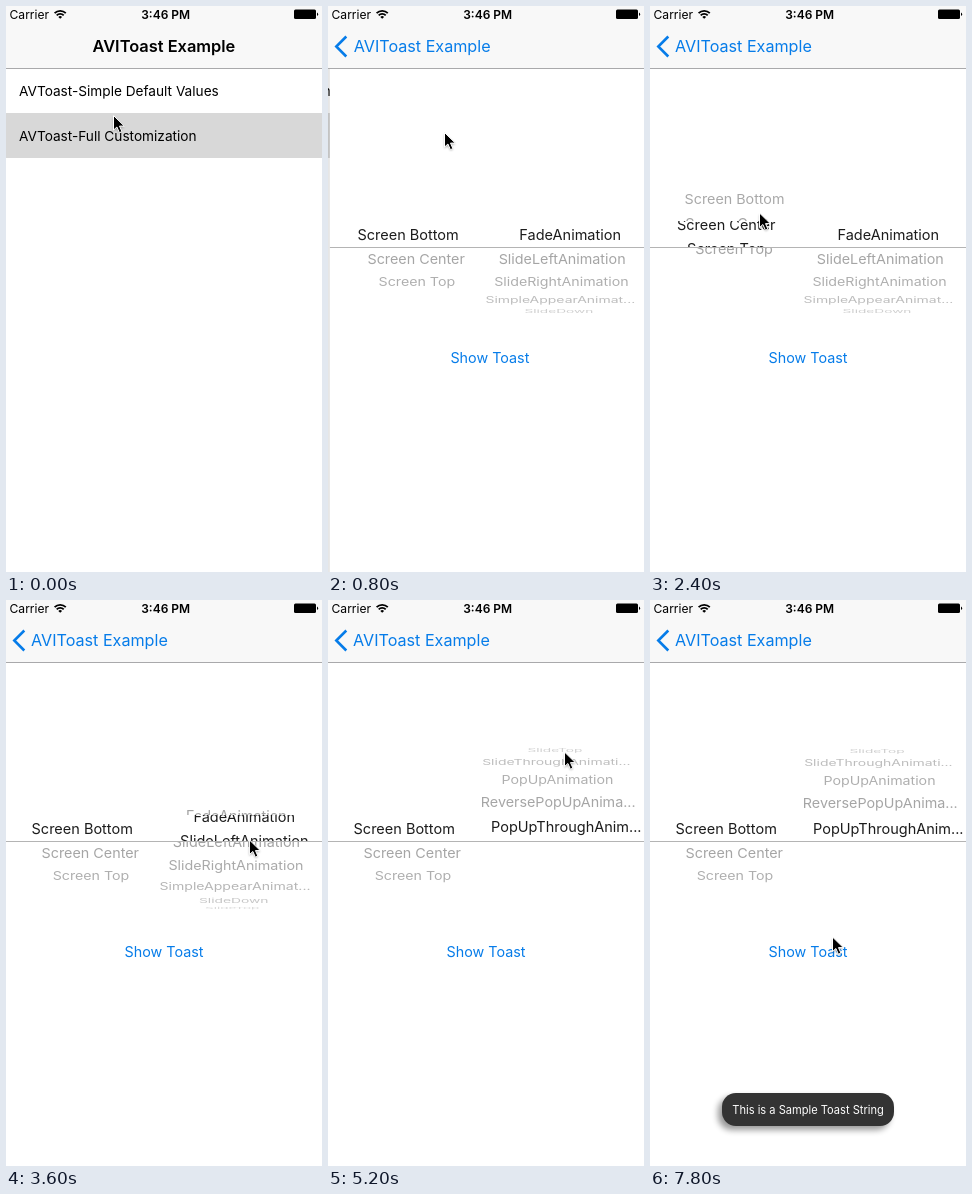
These frames come from a looping animation (316x566 px, 8 s). An HTML page:

```html
<!DOCTYPE html>
<html lang="en">
<head>
<meta charset="utf-8">
<title>Toast example</title>
<style>
html, body { margin: 0; width: 100%; height: 100%; overflow: hidden; background: #fff; }
svg { display: block; width: 100vw; height: 100vh; font-family: Inter, Roboto, sans-serif; }
.mid { text-anchor: middle; }
.grey { fill: #a2a2a2; font-size: 14.4px; }
.dark { fill: #1c1c1c; font-size: 14.5px; }
.blue { fill: #067ce9; }
</style>
</head>
<body>
<svg viewBox="0 0 316 566">
  <defs>
    <clipPath id="band"><rect y="215" width="316" height="26"/></clipPath>
    <clipPath id="around"><path d="M0 130H316V215H0ZM0 241H316V330H0Z"/></clipPath>
    <filter id="blur" x="-20%" y="-60%" width="140%" height="220%"><feGaussianBlur stdDeviation="3"/></filter>
    <filter id="soft" x="-50%" y="-50%" width="200%" height="200%"><feGaussianBlur stdDeviation="1"/></filter>
  </defs>

  <g id="list" font-size="13.65">
    <rect y="107" width="316" height="45" fill="#d8d8d8"/>
    <text x="13" y="89.5">AVToast-Simple Default Values</text>
    <text x="13" y="134.5">AVToast-Full Customization</text>
  </g>
  <rect id="dim" y="62" width="316" height="504"/>
  <rect id="page" y="62" width="316" height="504" fill="#fff"/>

  <g id="content">
    <g id="outer" class="mid grey" clip-path="url(#around)"></g>
    <g id="inner" class="mid dark" clip-path="url(#band)"></g>
    <rect x="-2" y="241" width="320" height="1" fill="#b4b4b4"/>
    <text id="button" class="mid blue" x="158" y="356.5" font-size="14.35">Show Toast</text>
  </g>

  <rect width="316" height="62" fill="#f8f8f8"/>
  <rect y="62" width="316" height="1" fill="#a9a9ab"/>
  <text x="3.5" y="12.5" font-size="12.1">Carrier</text>
  <g fill="none" stroke="#000" stroke-width="1.8">
    <path d="M48.6 7.2a7.8 7.8 0 0 1 11.2 0M50.7 9.4a4.9 4.9 0 0 1 7 0"/>
    <path d="M54.2 12.8l-1.9-1.9a2.7 2.7 0 0 1 3.8 0z" fill="#000" stroke="none"/>
  </g>
  <text class="mid" x="159.7" y="12.5" font-size="12" font-weight="600">3:46 PM</text>
  <rect x="288" y="3.5" width="22" height="9.5" rx="1.5"/>
  <path d="M311 6.5a2 2 0 0 1 0 3.6z"/>
  <path id="chevron" d="M18.3 30.5L8.3 40.5L18.3 50.5" fill="none" stroke="#067ce9" stroke-width="2.6"/>
  <text id="title" y="46" font-size="16.4" font-weight="600">AVIToast Example</text>
  <text id="back" class="blue" y="46" font-size="16.15">AVIToast Example</text>

  <g id="toast">
    <rect id="shade" x="-90" y="-12.5" width="172" height="33" rx="14" filter="url(#blur)"/>
    <rect x="-86" y="-16.5" width="172" height="33" rx="14" fill="#333"/>
    <text class="mid" y="4" font-size="11.1" fill="#fff">This is a Sample Toast String</text>
  </g>

  <g id="cursor">
    <path d="M0 1.5V16L3.4 13L6 18L8.4 17L6 12H10.8Z" opacity=".35" filter="url(#soft)"/>
    <path d="M0 0V14.6L3.4 11.5L5.9 17.2L8.4 16.1L6 10.6H10.8Z" stroke="#fff" stroke-width="1" stroke-linejoin="round"/>
  </g>
</svg>
<script>
const LOOP = 8000, STEP = 200, WIDTH = 316;
const CENTER = 228, RADIUS = 81, ANGLE = Math.PI / 10, PITCH = 24;
const $ = id => document.getElementById(id);

// progress 0..1 of t between a and b, linear and eased
const ramp = (t, a, b) => Math.min(1, Math.max(0, (t - a) / (b - a)));
const ease = (t, a, b) => { const u = ramp(t, a, b); return u * u * (3 - 2 * u); };

const columns = [
  { x: -74, darkX: 76.2, names: ["Screen Bottom", "Screen Center", "Screen Top"],
    scroll: t => 1.42 * Math.sin(Math.PI * ramp(t, 1800, 3000)) ** 2 },
  { x: 72.5, darkX: 238.3,
    names: ["FadeAnimation", "SlideLeftAnimation", "SlideRightAnimation", "SimpleAppearAnimat...",
      "SlideDown", "SlideTop", "SlideThroughAnimati...", "PopUpAnimation",
      "ReversePopUpAnima...", "PopUpThroughAnim..."],
    // drag past the last row, then spring back to it
    scroll: t => 10.12 * ease(t, 3450, 4600) - 1.12 * ease(t, 4600, 5300) }
];

// pointer moves: start, end, destination
const moves = [
  [0, 200, 112, 126.5], [400, 800, 116.5, 126.5], [1000, 1600, 176, 337], [1600, 2000, 112, 242],
  [2000, 2400, 109.5, 207], [2600, 3400, 244, 247], [3400, 4600, 236.5, 152],
  [5200, 6000, 177.5, 352], [6400, 7000, 196, 317], [7400, 7800, 182.5, 337]
];

function pointer(t) {
  let x = 107.5, y = 109.5;
  for (const [a, b, toX, toY] of moves) {
    const u = ease(t, a, b);
    x += (toX - x) * u;
    y += (toY - y) * u;
  }
  return [x, y];
}

function addText(parent, string, y) {
  const node = document.createElementNS("http://www.w3.org/2000/svg", "text");
  node.textContent = string;
  node.setAttribute("y", y);
  return parent.appendChild(node);
}

const set = (node, name, value) => node.setAttribute(name, value);
const fade = (id, value) => set($(id), "opacity", value);
const move = (node, x, y, extra = "") => set(node, "transform", `translate(${x} ${y}) ${extra}`);

for (const c of columns)
  c.rows = c.names.map(s => ({ grey: addText($("outer"), s, 5.5), dark: addText($("inner"), s, 5.8) }));

function drawWheel(c, t) {
  const pos = c.scroll(t);
  c.rows.forEach((row, i) => {
    const d = i - pos, cos = Math.cos(d * ANGLE), seen = Math.abs(d) < 4.9;
    const size = 1 - .07 * (1 - cos);
    set(row.grey, "opacity", seen ? .3 + .7 * cos : 0);
    if (seen)
      move(row.grey, 158 + c.x * size, CENTER + RADIUS * Math.sin(d * ANGLE), `scale(${size} ${cos})`);
    move(row.dark, c.darkX, CENTER + d * PITCH);
  });
}

function draw(t) {
  const shift = WIDTH * (1 - ramp(t, 400, 920)) ** 3, done = 1 - shift / WIDTH;
  move($("list"), -.3 * WIDTH * done, 0);
  fade("dim", .1 * done);
  set($("page"), "x", done ? Math.max(0, shift - 2) : WIDTH);
  move($("content"), shift + (done ? 0 : 2), 0);

  const swap = ease(done, .2, .95), titleX = 86.5 - 61.5 * done;
  set($("title"), "x", titleX);
  set($("back"), "x", titleX);
  fade("title", 1 - swap);
  fade("back", swap);
  fade("chevron", swap);

  columns.forEach(c => drawWheel(c, t));
  fade("button", t < 6000 ? 1 : .2 + .8 * ramp(t, 6000, 6400) ** 2);

  const scale = ease(t, 6100, 6430);
  move($("toast"), 158, 509.5, `scale(${scale})`);
  fade("toast", scale ** 1.35);
  fade("shade", .4 * ease(t, 6300, 6700));

  move($("cursor"), ...pointer(t));
}

const start = performance.now();
function tick() {
  const t = (performance.now() - start) % LOOP;
  draw(Math.floor(t / STEP) * STEP);
  requestAnimationFrame(tick);
}
tick();
</script>
</body>
</html>
```
